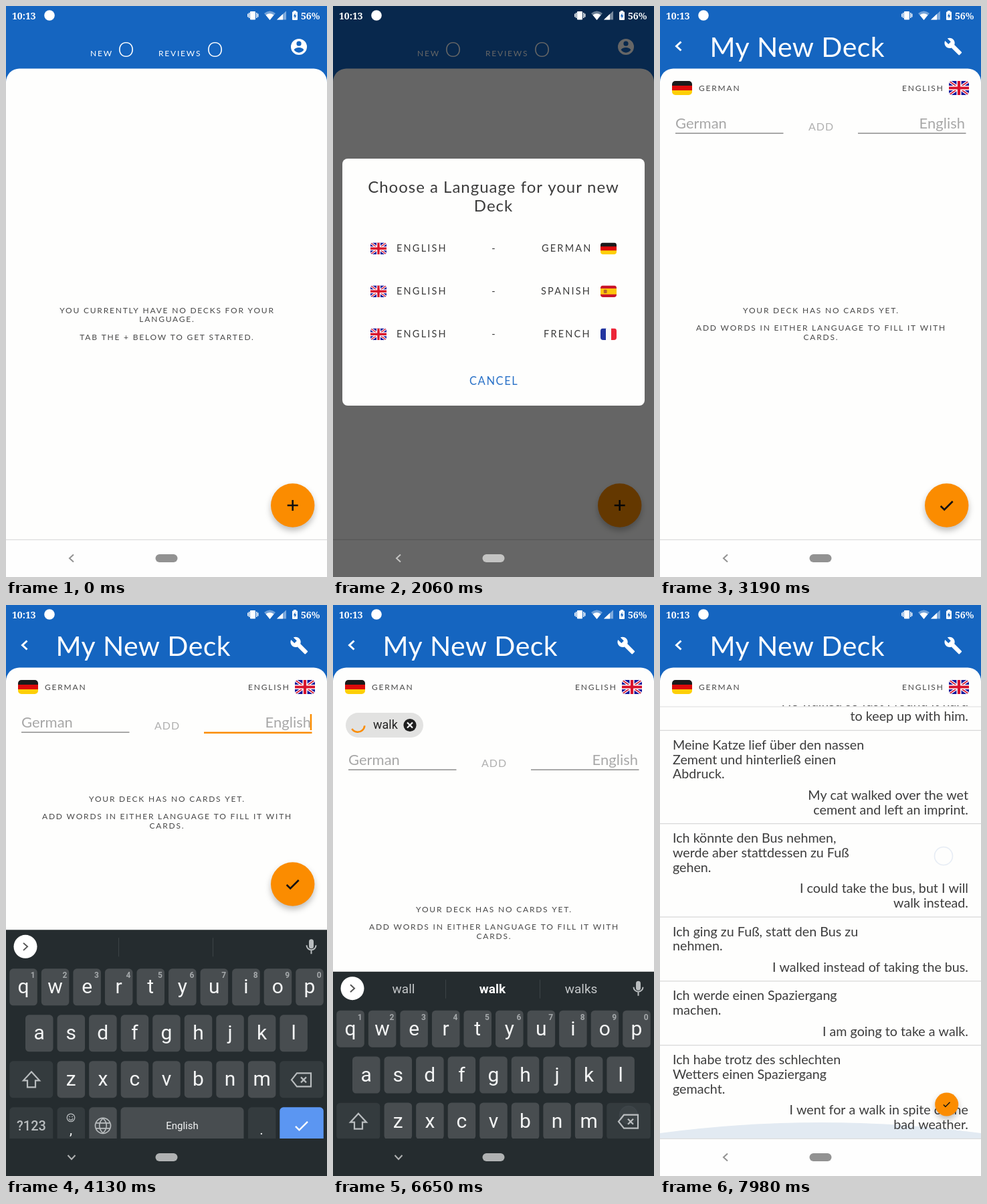
Recreate the animation shown at these times as an HTML page with a canvas. Size 480x853 px, loop 8 s.

```html
<!DOCTYPE html>
<html lang="en">
<head>
<meta charset="utf-8">
<title>Creating a deck</title>
<style>
  html, body { margin: 0; width: 100%; height: 100%; overflow: hidden; background: #fefefd; }
  canvas { display: block; width: 480px; height: 853px; }
</style>
</head>
<body>
<canvas id="stage" width="480" height="853"></canvas>
<script>
const ctx = document.getElementById('stage').getContext('2d');
const BLUE = '#1565c0', ORANGE = '#fb8c00', PAPER = '#fefefd', INK = '#3c3c3c', KEYBOARD = '#252c2f';
const LOOP = 8000, TAU = Math.PI * 2;

// timing helpers
const ramp = (t, a, b) => Math.min(1, Math.max(0, (t - a) / (b - a)));
const easeOut = p => 1 - (1 - p) ** 3;
const mix = (a, b, p) => a + (b - a) * p;

// drawing helpers
function group(alpha, draw) {
  if (alpha <= 0) return;
  ctx.save();
  ctx.globalAlpha *= alpha;
  draw();
  ctx.restore();
}
function text(str, x, y, size, color = INK, { align = 'left', ls = 0, face = 'Lato', weight = 400 } = {}) {
  ctx.font = `${weight} ${size}px "${face}", ${face === 'Noto Serif' ? 'serif' : 'sans-serif'}`;
  ctx.letterSpacing = ls + 'px';
  ctx.textAlign = align;
  ctx.fillStyle = color;
  ctx.fillText(str, x, y);
}
function rect(x, y, w, h, color, r = 0) {
  ctx.fillStyle = color;
  ctx.beginPath();
  ctx.roundRect(x, y, w, h, r);
  ctx.fill();
}
function disc(x, y, r, color) {
  ctx.fillStyle = color;
  ctx.beginPath();
  ctx.arc(x, y, r, 0, TAU);
  ctx.fill();
}
function ring(x, y, r, color, width, from = 0, to = TAU) {
  ctx.strokeStyle = color;
  ctx.lineWidth = width;
  ctx.beginPath();
  ctx.arc(x, y, r, from, to);
  ctx.stroke();
}
function path(d, x, y, { fill, stroke, width = 2, scale = 1 }) {
  const shape = new Path2D(d);
  ctx.save();
  ctx.translate(x, y);
  ctx.scale(scale, scale);
  if (fill) { ctx.fillStyle = fill; ctx.fill(shape, 'evenodd'); }
  if (stroke) { ctx.strokeStyle = stroke; ctx.lineWidth = width; ctx.stroke(shape); }
  ctx.restore();
}
const caps = (str, x, y, color = '#484848', align = 'left') => text(str, x, y, 12, color, { align, ls: 1.79 });
const centeredCaps = (str, y) => caps(str, 241, y, undefined, 'center');

const ICONS = {
  wrench: 'M22.7 19l-9.1-9.1c.9-2.3.4-5-1.5-6.9-2-2-5-2.4-7.4-1.3L9 6 6 9 1.6 4.7C.4 7.1.9 10.1 2.9 12.1c1.9 1.9 4.6 2.4 6.9 1.5l9.1 9.1c.4.4 1 .4 1.4 0l2.3-2.3c.5-.4.5-1.1.1-1.4z',
  account: 'M12 2a10 10 0 1 0 0 20a10 10 0 1 0 0-20zM12 5a3 3 0 1 0 0 6a3 3 0 1 0 0-6zM12 19.2c-2.5 0-4.7-1.3-6-3.2 0-2 4-3.1 6-3.1s6 1.1 6 3.1c-1.3 1.9-3.5 3.2-6 3.2z',
  check: 'M-9 1L-3.5 6.5L9-6',
  plus: 'M-8 0H8M0-8V8',
  back: 'M4-6.5L-3 0L4 6.5',
  cross: 'M-4-4L4 4M4-4L-4 4'
};

function flag(kind, x, y, w, h) {
  const bands = {
    german: ['#1b1b1b', '#dd0a0a', '#fdcf08'],
    spanish: ['#c8142a', '#fdc50a', '#fdc50a', '#c8142a'],
    french: ['#22349f', '#f7f7f7', '#ec2638']
  }[kind];
  ctx.save();
  ctx.beginPath();
  ctx.roundRect(x, y, w, h, w / 6);
  ctx.clip();
  if (bands) bands.forEach((color, i) => {
    const n = bands.length;
    if (kind === 'french') rect(x + w * i / n, y, w / n + 1, h, color);
    else rect(x, y + h * i / n, w, h / n + 1, color);
  });
  if (kind === 'spanish') rect(x + w * .2, y + h * .36, w * .2, h * .3, '#b5632a', 1);
  if (kind === 'english') {
    rect(x, y, w, h, '#14149b');
    const diagonals = `M0 0L${w} ${h}M${w} 0L0 ${h}`, cross = `M${w / 2} 0V${h}M0 ${h / 2}H${w}`;
    path(diagonals, x, y, { stroke: '#fff', width: h * .2 });
    path(diagonals, x, y, { stroke: '#d8142e', width: h * .08 });
    path(cross, x, y, { stroke: '#fff', width: h * .34 });
    path(cross, x, y, { stroke: '#d8142e', width: h * .2 });
  }
  ctx.restore();
}

function fab(icon, y, scale = 1) {
  ctx.save();
  ctx.translate(428.7, y);
  ctx.scale(scale, scale);
  ctx.shadowColor = 'rgba(0,0,0,.26)';
  ctx.shadowBlur = 10;
  ctx.shadowOffsetY = 5;
  disc(0, 0, 32.7, ORANGE);
  ctx.shadowColor = 'transparent';
  path(ICONS[icon], 0, 0, { stroke: '#111', width: 2.6 });
  ctx.restore();
}

function pageBase() {
  rect(0, 0, 480, 853, PAPER);
  rect(0, 0, 480, 120, BLUE);
  rect(0, 93.5, 480, 760, PAPER, [20, 20, 0, 0]);
}

function homePage() {
  pageBase();
  caps('NEW', 126, 75, '#fff');
  caps('REVIEWS', 228, 75, '#fff');
  for (const x of [179.5, 312.5]) text('O', x, 75.5, 31, '#fff', { align: 'center', weight: 300 });
  path(ICONS.account, 423.6, 46.6, { fill: '#fff', scale: 1.2 });
  centeredCaps('YOU CURRENTLY HAVE NO DECKS FOR YOUR', 458.5);
  centeredCaps('LANGUAGE.', 472);
  centeredCaps('TAB THE + BELOW TO GET STARTED.', 498.5);
  fab('plus', 746);
}

function languageDialog() {
  rect(0, 0, 480, 853, 'rgba(0,0,0,.6)');
  rect(14, 228, 452, 369, PAPER, 8);
  const title = { align: 'center', ls: 1 };
  text('Choose a Language for your new', 240, 279, 24, INK, title);
  text('Deck', 240, 306.5, 24, INK, title);
  [['german', 312], ['spanish', 311], ['french', 315]].forEach(([name, x], i) => {
    const y = 362 + i * 64;
    flag('english', 56, y - 8.5, 24, 17.5);
    text('ENGLISH', 95, y + 5, 14.5, INK, { ls: 2.2 });
    text('-', 240, y + 5, 14.5, INK, { align: 'center' });
    text(name.toUpperCase(), x, y + 5, 14.5, INK, { ls: 2.2 });
    flag(name, 400, y - 8.5, 24, 17.5);
  });
  text('CANCEL', 204, 565.5, 16.5, '#2a72c8', { ls: 1.6 });
}

// typing: each entry is [time, text so far, suggestions]
const TYPED = [
  [3920, '', []],
  [4640, 'w', ['we', 'w', 'was']],
  [4920, 'wa', ['wa', 'was', 'way']],
  [5540, 'wal', ['wal', 'walk', 'Wal']],
  [5730, 'walk', ['wall', 'walk', 'walks']]
];
const SUBMIT = 6520, KEYBOARD_OUT = 6560, LOADED = 6960;
const typedAt = t => t < SUBMIT ? TYPED.findLast(entry => t >= entry[0]) : undefined;

function inputRow(t, dy) {
  const entry = typedAt(t), word = entry ? entry[1] : '';
  ctx.save();
  ctx.translate(0, dy);
  text('German', 23, 182.5, 22, '#a8a8a8');
  rect(23, 189.5, 161.5, 1.3, '#777');
  text('ADD', 222, 185.5, 16, word ? '#2a6cc0' : '#b0b0b0', { ls: 1 });
  text(word || 'English', 456, 182.5, 22, word ? '#222' : '#a8a8a8', { align: 'right' });
  if (word) {
    const w = ctx.measureText(word).width;
    rect(456 - w, 185, w, 1.2, '#222');
  }
  if (entry) rect(296, 189.5, 161.5, 2.6, ORANGE);
  else rect(296, 189.5, 161.5, 1.3, '#777');
  if (entry && t - entry[0] < 500) rect(454.7, 163, 2.5, 24, ORANGE);
  ctx.restore();
}

function chip(t) {
  rect(19, 161, 116, 37, '#e2e2e1', 18.5);
  const turn = (t - 6790) * .0063;
  ring(37, 179.5, 10.3, ORANGE, 2.6, turn + .95, turn + 3.45);
  text('walk', 60, 185, 18, '#222', { face: 'Roboto' });
  disc(115, 179.5, 9.6, '#1f1f1f');
  path(ICONS.cross, 115, 179.5, { stroke: '#fff', width: 2.2 });
}

const CARDS = [
  ['Ich gehe gern zu Fuß zur|Schule.', 'I like walking to school.'],
  ['Er lief so schnell, dass ich|Mühe hatte, mit ihm Schritt|zu halten.', 'He walked so fast I found it hard|to keep up with him.'],
  ['Meine Katze lief über den nassen|Zement und hinterließ einen|Abdruck.', 'My cat walked over the wet|cement and left an imprint.'],
  ['Ich könnte den Bus nehmen,|werde aber stattdessen zu Fuß|gehen.', 'I could take the bus, but I will|walk instead.'],
  ['Ich ging zu Fuß, statt den Bus zu|nehmen.', 'I walked instead of taking the bus.'],
  ['Ich werde einen Spaziergang|machen.', 'I am going to take a walk.'],
  ['Ich habe trotz des schlechten|Wetters einen Spaziergang|gemacht.', 'I went for a walk in spite of the|bad weather.']
].map(card => card.map(side => side.split('|')));
const LINE = 21.8, LIST_TOP = 207, LIST_BOTTOM = 797;
const cardHeight = ([de, en]) => 74 + LINE * (de.length + en.length - 2);
const MAX_SCROLL = LIST_TOP + CARDS.reduce((sum, card) => sum + cardHeight(card), 0) - LIST_BOTTOM;

function cardList(scroll) {
  let top = LIST_TOP - scroll;
  for (const card of CARDS) {
    rect(0, top - .5, 480, 1.2, '#d8d8d8');
    let y = top + 28.5;
    for (const line of card[0]) { text(line, 19, y, 19.7); y += LINE; }
    y += 9.7;
    for (const line of card[1]) { text(line, 461, y, 19.7, INK, { align: 'right' }); y += LINE; }
    top += cardHeight(card);
  }
}

function deckPage(t) {
  const resized = t >= 3990 && t < KEYBOARD_OUT;
  const scroll = MAX_SCROLL * easeOut(ramp(t, 7755, 7960));
  const pending = t >= SUBMIT && t < LOADED;
  pageBase();
  ctx.save();
  ctx.beginPath();
  ctx.rect(0, 150, 480, LIST_BOTTOM - 150);
  ctx.clip();
  group(ramp(t, 7925, 7980), () =>
    path('M0 797V789Q240 757 480 789V797Z', 0, 0, { fill: '#e2eaf2' }));
  if (pending) chip(t);
  inputRow(t, pending ? 56 : -scroll);
  group(ramp(t, LOADED, 7130), () => cardList(scroll));
  ctx.restore();
  if (scroll > 0) rect(0, 151.5, 480, 1, '#dedede');

  path(ICONS.back, 27.5, 60, { stroke: '#fff', width: 3 });
  text('My New Deck', 74.5, 76, 41, '#fff', { ls: .4 });
  path(ICONS.wrench, 424.3, 46.5, { fill: '#fff', scale: 1.17 });
  flag('german', 18, 112, 30, 21);
  caps('GERMAN', 58, 127);
  caps('ENGLISH', 362, 127);
  flag('english', 432, 112, 30, 21);

  if (t < LOADED) {
    const dy = resized ? -165 : 0;
    centeredCaps('YOUR DECK HAS NO CARDS YET.', 458.5 + dy);
    centeredCaps('ADD WORDS IN EITHER LANGUAGE TO FILL IT WITH', 485 + dy);
    centeredCaps('CARDS.', 498.5 + dy);
  }
  fab('check', resized ? 417 : 746, mix(1, .535, ramp(t, 7790, 7960)));
}

function keyboard(t) {
  const key = (x, y, w, color = '#484d50') => rect(x, y, w, 55, color, 5.5);
  const roboto = (str, x, y, size, weight = 400, color = '#f4f5f5') =>
    text(str, x, y, size, color, { align: 'center', face: 'Roboto', weight });
  const SPECIAL = '#343b3e', ICON = '#b9bdbf';
  rect(0, 468, 480, 385, KEYBOARD);

  disc(29, 493, 17.5, '#fff');
  path('M-3-5.5L3 0L-3 5.5', 29, 493, { stroke: '#555', width: 2 });
  for (const x of [168, 309]) rect(x, 480, 1, 28, '#3c4346');
  const suggestions = (typedAt(t) || TYPED[4])[2];
  suggestions.forEach((word, i) =>
    roboto(word, [105.5, 238.5, 371][i], 500.5, 19, i === 1 ? 700 : 400, i === 1 ? '#fff' : '#c4c7c9'));
  rect(453, 482, 7, 14, ICON, 3.5);
  path('M-7-2A7 7 0 0 0 7-2M0 5V11', 456.5, 493, { stroke: ICON, width: 2 });

  ['qwertyuiop', 'asdfghjkl', 'zxcvbnm'].forEach((row, r) => {
    [...row].forEach((letter, i) => {
      const x = [5.3, 29, 76.6][r] + i * 47.55, y = 526 + r * 68.9;
      key(x, y, 41.5);
      roboto(letter, x + 20.7, y + 37, 30);
      if (r === 0) roboto((i + 1) % 10, x + 35, y + 14, 12, 700, '#a5a9ab');
    });
  });

  key(5.3, 664, 65, SPECIAL);
  path('M0-12L12 1H6V11H-6V1H-12Z', 38, 692, { stroke: ICON, width: 2.2 });
  key(409.3, 664, 65.5, SPECIAL);
  path('M-15 0L-7-10H14V10H-7Z', 442, 692, { stroke: ICON, width: 2.2 });
  path(ICONS.cross, 445, 692, { stroke: ICON, width: 2.2 });

  key(5.3, 733, 65, SPECIAL);
  roboto('?123', 38, 767.5, 20, 500, ICON);
  key(76.6, 733, 41.5, SPECIAL);
  ring(97, 748.5, 5.8, ICON, 1.3);
  ring(97, 749, 3, ICON, 1.2, .2, 2.9);
  disc(95, 747, .9, ICON);
  disc(99, 747, .9, ICON);
  roboto(',', 97, 774, 21);
  key(124.2, 733, 41.5);
  ring(145, 760.5, 11.5, ICON, 1.7);
  path('M-11-4H11M-11 4H11M0-11C-7-5-7 5 0 11M0-11C7-5 7 5 0 11', 145, 760.5, { stroke: ICON, width: 1.6 });
  key(171.5, 733, 184);
  roboto('English', 263.5, 766, 15);
  key(362, 733, 41.5, SPECIAL);
  roboto('.', 382, 774, 21);
  key(409.3, 733, 65.5, '#5b96f2');
  path(ICONS.check, 442, 760.5, { stroke: '#fff', width: 2.4 });
}

function statusBar() {
  const bold = { face: 'Noto Serif', weight: 600 };
  text('10:13', 9, 20, 14, '#fff', bold);
  disc(65, 14, 7.8, '#fff');
  rect(365, 8, 8, 12.5, '#fff', 1);
  for (const x of [361, 376]) rect(x, 11.5, 1.4, 5, '#fff');
  for (const x of [363, 374]) rect(x, 10, 1.4, 8, '#fff');
  path('M386 11Q394.5 4 403 11L394.5 21Z', 0, 0, { fill: 'rgba(255,255,255,.4)' });
  path('M388.5 13.5Q394.5 9 400.5 13.5L394.5 21Z', 0, 0, { fill: '#fff' });
  path('M405 20.5L419 7.5V20.5Z', 0, 0, { fill: 'rgba(255,255,255,.45)' });
  path('M405 20.5L414 12V20.5Z', 0, 0, { fill: '#fff' });
  rect(430, 7, 4, 2, '#fff');
  rect(428, 8.5, 8, 12.5, '#fff', 1);
  path('M432.5 10.5L429.8 15.5H431.6V19L434.3 14H432.5Z', 0, 0, { fill: BLUE });
  text('56%', 441, 20, 14, '#fff', bold);
}

function navBar(keyboardUp, dim) {
  if (keyboardUp) rect(0, 797, 480, 56, KEYBOARD);
  else {
    const shade = v => `rgb(${[v, v, v].map(c => c * (1 - .6 * dim))})`;
    rect(0, 797, 480, 56, shade(254));
    rect(0, 796.7, 480, 1.4, shade(220));
  }
  const tint = keyboardUp ? '#b0b2b3' : dim > .5 ? '#c4c4c3' : '#929292';
  rect(223.5, 819, 33, 12, tint, 6);
  path(keyboardUp ? 'M-5.5-3L0 3L5.5-3' : 'M3-5.5L-3 0L3 5.5', 98, 825, { stroke: tint, width: 2 });
}

// finger dots: [pressed, released, x, y, y at release]
const TOUCHES = [
  [1600, 1690, 439, 751], [2770, 2850, 345, 366], [3850, 3920, 400, 176],
  [4560, 4640, 72, 556], [4840, 4920, 52, 624], [5430, 5540, 428, 628],
  [5640, 5730, 382, 626], [6460, 6530, 442, 762], [7750, 7910, 424, 660, 375]
];
function touches(t) {
  for (const [from, to, x, y, endY = y] of TOUCHES) {
    if (t < from || t > to + 130) continue;
    group(1 - ramp(t, to, to + 130), () => {
      const cy = mix(y, endY, easeOut(ramp(t, from, to)));
      disc(x, cy, 13.5, 'rgba(255,255,255,.6)');
      ring(x, cy, 13.5, 'rgba(185,203,228,.75)', 1.6);
    });
  }
}

function draw(t) {
  const deck = ramp(t, 2950, 3190);
  const dialog = ramp(t, 1790, 2050) * (1 - ramp(t, 2860, 3060));
  const raised = easeOut(ramp(t, 3970, 4220)) * (1 - ramp(t, KEYBOARD_OUT, 6760) ** 2);
  if (deck < 1) homePage();
  group(deck, () => deckPage(t));
  navBar(false, 0);
  group(dialog, languageDialog);
  if (raised > 0) {
    ctx.save();
    ctx.translate(0, (1 - raised) * 385);
    keyboard(t);
    ctx.restore();
  }
  if (raised > .3 || dialog > 0) navBar(raised > .3, dialog);
  statusBar();
  touches(t);
}

function tick(now) {
  draw(now % LOOP);
  requestAnimationFrame(tick);
}
requestAnimationFrame(tick);
</script>
</body>
</html>
```
